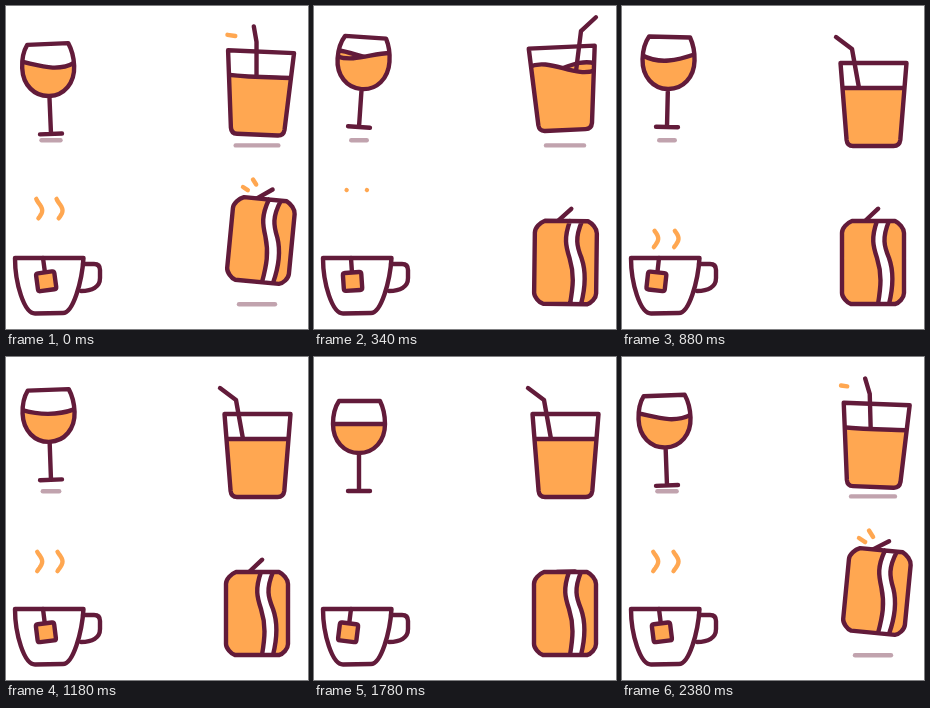
Recreate the animation shown at these times as an HTML page with a canvas. Size 302 px wide and 323 px high, loop 2400 ms.

```html
<!DOCTYPE html>
<html>
<head>
<meta charset="utf-8">
<style>
html, body { margin: 0; width: 100%; height: 100%; overflow: hidden; background: #fff; }
canvas { display: block; }
</style>
</head>
<body>
<canvas id="stage" width="302" height="323"></canvas>
<script>
const ctx = document.getElementById('stage').getContext('2d');
const DARK = '#621b3a', ORANGE = '#ffa751', SHADOW = '#c1a3ae';
const LOOP = 2400, LEAD = 300; // tracks start LEAD ms before the loop point

const clamp = (v, lo = 0, hi = 1) => Math.min(hi, Math.max(lo, v));
const mix = (a, b, k) => a + (b - a) * k;

// Smooth track through rows of [time, ...values], level at every extreme
function track(rows, t) {
  const last = rows.length - 1;
  if (t <= rows[0][0]) return rows[0].slice(1);
  if (t >= rows[last][0]) return rows[last].slice(1);
  const i = rows.findIndex(r => r[0] > t) - 1;
  const span = rows[i + 1][0] - rows[i][0], u = (t - rows[i][0]) / span;
  return rows[i].slice(1).map((a, n) => {
    const c = n + 1, b = rows[i + 1][c];
    const slope = j => {
      if (j < 1 || j >= last) return 0;
      const [p, q, r] = [rows[j - 1], rows[j], rows[j + 1]];
      const s = (q[c] - p[c]) / (q[0] - p[0]), e = (r[c] - q[c]) / (r[0] - q[0]);
      return s * e > 0 ? 2 * s * e / (s + e) : 0;
    };
    return a * (1 + 2 * u) * (1 - u) ** 2 + b * u * u * (3 - 2 * u)
      + span * (slope(i) * u * (1 - u) ** 2 - slope(i + 1) * u * u * (1 - u));
  });
}

function draw(d, stroke, fill) {
  const path = new Path2D(d);
  if (fill) { ctx.fillStyle = fill; ctx.fill(path); }
  if (stroke) { ctx.strokeStyle = stroke; ctx.stroke(path); }
}

function posed(x, y, lift, degrees, paint) {
  ctx.save();
  ctx.translate(x, y + lift);
  ctx.rotate(degrees * Math.PI / 180);
  ctx.translate(-x, -y);
  paint();
  ctx.restore();
}

function shadow(x, y, half, lift) {
  if (lift < -0.2) draw(`M${x - half},${y}H${x + half}`, SHADOW);
}

// Stroke running from (x0,y0) to (x1,y1): the head leads, the tail catches up
function spark(x0, y0, x1, y1, head, tail) {
  if (head <= 0 || tail >= 1) return;
  const at = k => `${mix(x0, x1, clamp(k))},${mix(y0, y1, clamp(k))}`;
  draw(`M${at(tail)}L${at(head)}`, ORANGE);
}

// Liquid with a front and a back surface; "between" is painted in the middle
function liquid(vessel, left, right, level, bottom, [a, b, c, d, back], between) {
  const surface = pts => {
    const [p, q, r, s] = pts.map(v => level + v), w = (right - left) / 3;
    const line = `M${left},${p}C${left + w},${q} ${right - w},${r} ${right},${s}`;
    ctx.save();
    ctx.clip(new Path2D(vessel));
    draw(line + `V${bottom}H${left}Z`, null, ORANGE);
    draw(line, DARK);
    ctx.restore();
  };
  const front = [a, b, c, d];
  if (back > 0.01) surface(front.map((v, i) => mix(v, front[3 - i], back)));
  if (between) between();
  surface(front);
}

const BOWL = 'M25,44H66C69,50 71,58 71,67C71,84 60,96 45,96C30,96 19,84 19,67C19,58 21,50 25,44Z';
const WINE_LIFT = [[50, 0], [290, -5.8], [600, -13], [1360, -13], [1760, -2.5], [1920, 0]];
const WINE_TILT = [[50, 0], [280, -2.1], [300, -2.4], [400, -3.6], [660, 4], [860, 0], [1000, -3.6],
  [1180, 1.3], [1280, 3], [1580, -3.8], [1760, -1.8], [1920, 0]];
const WINE_WAVE = [[60, 0, 0, 0, 0, 0], [300, -6.5, -2, 6, -3.4, 0], [640, -2, 3, -8, -9, 0.9],
  [860, -9, -9, 3, -2, 0.9], [1180, -4.4, 5, 0, -6.6, 0], [1480, -4, 2, 3, -3, 0],
  [1760, -1.3, 2, 2, -1.7, 0], [1960, 0, 0, 0, 0, 0]];

function wineGlass(t) {
  const [lift] = track(WINE_LIFT, t), [tilt] = track(WINE_TILT, t);
  shadow(45, 134.2, 11 + lift * 0.25, lift);
  posed(45, 134, lift, tilt, () => {
    liquid(BOWL, 18, 72, 67, 98, track(WINE_WAVE, t));
    draw(BOWL + 'M45,96V134M34,134H56', DARK);
  });
}

const TUMBLER = 'M218.5,57H284.5L278.3,134Q277.5,140 271.5,140H231Q225.3,140 224.6,134Z';
const TUMBLER_LIFT = [[72, 0], [280, -10], [300, -11.3], [520, -18.5], [640, -16], [860, -7], [1010, 0]];
const TUMBLER_TILT = [[72, 0], [280, 2.2], [310, 2.5], [640, -2.6], [750, -3], [860, -2.5], [1010, 0]];
const TUMBLER_WAVE = [[200, 0, 0, 0, 0, 0], [300, -0.8, 1, 0, 0, 0], [640, -6.5, -16, 8, -1, 1],
  [860, -1, 8, -16, -7, 1], [1100, 0, 0, 0, 0, 0]];

function tumbler(t) {
  const [lift] = track(TUMBLER_LIFT, t), [tilt] = track(TUMBLER_TILT, t);
  const turn = Math.PI * clamp((t - 72) / 530, 0, 2);
  const side = Math.cos(turn), depth = Math.sin(turn);
  const x = reach => 251 - reach * side;
  shadow(251, 139.4, 27 + lift * 0.5, lift);
  posed(251.5, 140, lift, tilt, () => {
    liquid(TUMBLER, 217, 286, 82, 142, track(TUMBLER_WAVE, t), () =>
      draw(`M${x(37)},${31 + depth * (depth < 0 ? 10 : 1)}L${x(21)},${43 + 4.5 * depth}L${x(14)},82`, DARK));
    draw(TUMBLER, DARK);
  });
  spark(214, 27.7, 229.3, 30, (t - 226) / 75, (t - 240) / 125);
  spark(289.5, 31.2, 276, 26.5, (t - 844) / 75, (t - 852) / 125);
}

function teaCup(t) {
  draw('M9,252H77.5C76,276 67,307 57,307L29,307.5C18,307.5 9,277 9,252Z', DARK);
  draw('M77,258H88Q94,258 94,264V272C94,281 86,285 75,285', DARK);
  const swing = -9.5 * Math.cos((t - LEAD - 120) * 2 * Math.PI / 1200);
  posed(37, 252, 0, swing, () => {
    draw('M37,252V266', DARK);
    draw('M30,266.5H44Q46.2,266.5 46.2,268.7V282.3Q46.2,284.5 44,284.5H30Q27.8,284.5 27.8,282.3V268.7Q27.8,266.5 30,266.5Z',
      DARK, ORANGE);
  });
}

function steam(t) {
  const p = (t - LEAD + LOOP - 700) % 1200;
  if (p <= 0 || p > 850) return;
  const head = Math.max(184, 243 - 0.1 * p);
  const tail = clamp(243 - 0.09 * Math.max(0, p - 160), head + 0.01, 243.01);
  for (const x of [33, 53.3]) {
    let d = '';
    for (let i = 0; i <= 12; i++) {
      const y = mix(head, tail, i / 12);
      d += `${i ? 'L' : 'M'}${x + 3.2 * Math.cos((y - 204.5) * 2 * Math.PI / 28)},${y}`;
    }
    draw(d, ORANGE);
  }
}

const CAN = 'M230,215H273C277,217 282,222 282,227V287C282,292 277,297 273,298H229C225,297 220,291 220,287V227C220,222 225,217 230,215Z';
const STRIPE_LEFT = 'M255,215C249,232 251,240 255,252C260,268 259,280 256,298';
const STRIPE_RIGHT = 'M267,215C260,232 262,240 267,252C272,266 271,282 267,298';
const CAN_LIFT = [[45, 0], [290, -22.3], [590, 0]];
const CAN_TILT = [[60, 0], [285, 5.5], [640, 0.7], [760, 0]];
const TAB = [[100, -2], [280, -32], [300, -35], [480, -43], [1770, -43], [1990, -2]];

function can(t) {
  const [lift] = track(CAN_LIFT, t), [tilt] = track(CAN_TILT, t), [tab] = track(TAB, t);
  shadow(251, 298.2, 26 + lift * 0.36, lift);
  posed(251, 298, lift, tilt, () => {
    posed(243, 215, 0, tab, () => draw('M243,215H261', DARK));
    draw(CAN, null, ORANGE);
    draw(STRIPE_LEFT + 'L267,298C271,282 272,266 267,252C262,240 260,232 267,215Z', null, '#fff');
    draw(STRIPE_LEFT + STRIPE_RIGHT + CAN, DARK);
  });
  const head = (t - 210) / 70, tail = (t - 240) / 130;
  spark(246, 187, 237, 181, head, tail);
  spark(253, 183, 247, 173.5, head, tail);
}

function frame() {
  const t = (performance.now() + LEAD) % LOOP;
  ctx.fillStyle = '#fff';
  ctx.fillRect(0, 0, 302, 323);
  ctx.lineWidth = 4.4;
  ctx.lineCap = ctx.lineJoin = 'round';
  for (const part of [wineGlass, tumbler, steam, teaCup, can]) part(t);
  requestAnimationFrame(frame);
}
frame();
</script>
</body>
</html>
```
